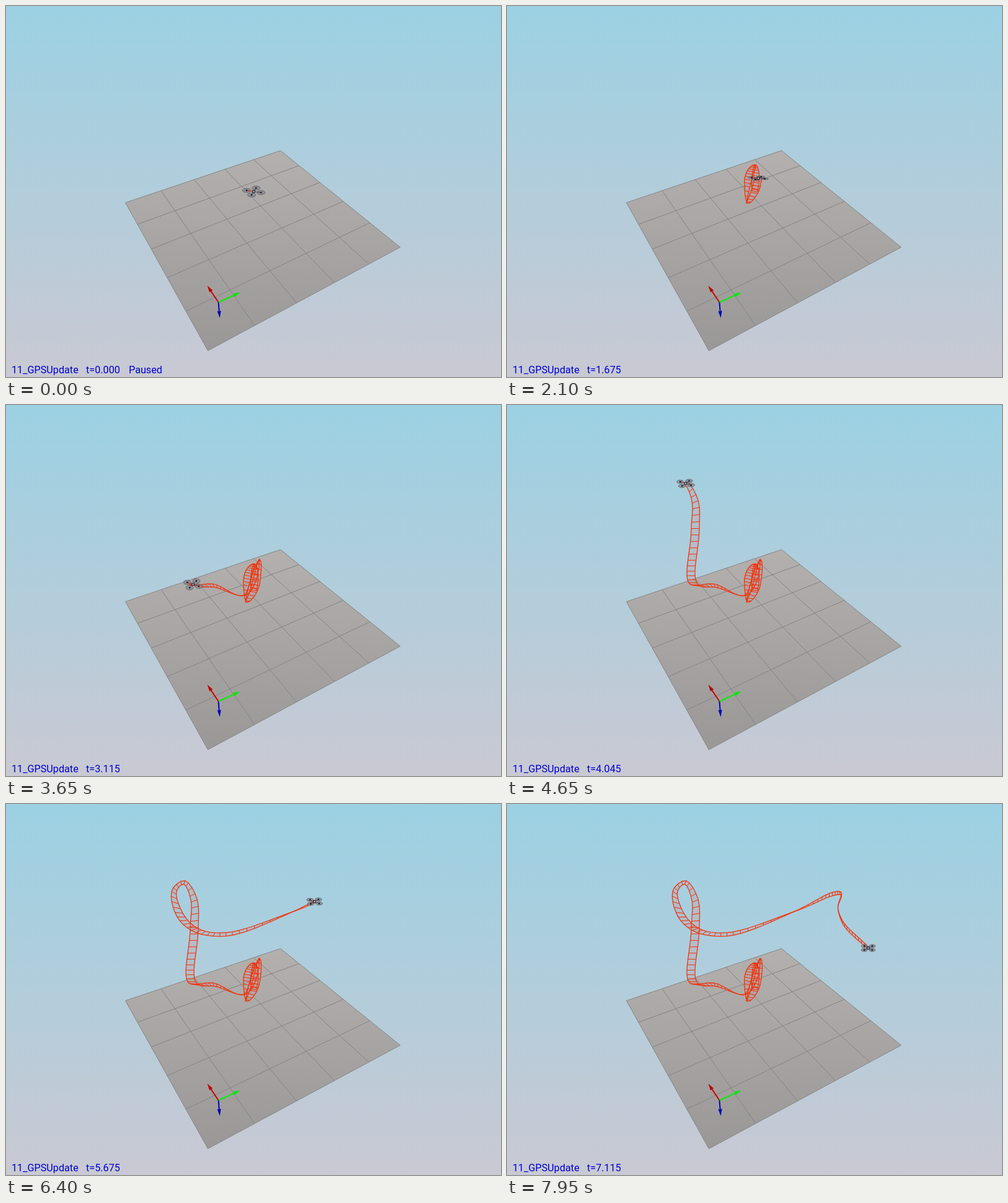
Animation, 798 px wide and 599 px high, one loop 8000 ms. Source, as an HTML page with a canvas:

```html
<!DOCTYPE html>
<html lang="en">
<head>
<meta charset="utf-8">
<title>Drone flight</title>
<style>
html, body { margin: 0; width: 100%; height: 100%; overflow: hidden; }
canvas { display: block; }
</style>
</head>
<body>
<canvas id="stage" width="798" height="599"></canvas>
<script>
const ctx = document.getElementById('stage').getContext('2d');
const LOOP = 8000, TICK = 50, PAUSE = 300, RATE = .93, RUNG = .05;
const { PI, sin, cos } = Math;

// Waypoints of the flight: [seconds, x, y]
const PATH = [
  [0, 399, 299], [.52, 400, 256], [1.025, 387, 288], [1.25, 386, 317],
  [1.55, 400, 296], [1.9, 408, 249], [2.315, 387, 305], [2.8, 334, 291],
  [3.13, 300, 288], [3.65, 303, 199], [3.85, 303, 156], [4.05, 287, 126],
  [4.2, 272, 137], [4.5, 282, 182], [4.75, 310, 205], [5, 354, 210],
  [5.47, 463, 173], [5.9, 524, 145], [6.1, 538, 144], [6.4, 533, 168],
  [6.65, 541, 191], [7.115, 582, 232]
];

const ramp = (t, from, to) => Math.min(1, Math.max(0, (t - from) / (to - from)));

// Smooth curve through the waypoints, with time-weighted tangents
function position(t) {
  const last = PATH.length - 1;
  let i = 0;
  while (i < last - 1 && PATH[i + 1][0] <= t) i++;
  const span = PATH[i + 1][0] - PATH[i][0];
  const f = ramp(t, PATH[i][0], PATH[i + 1][0]);
  return [1, 2].map(axis => {
    const slope = n => (PATH[n + 1][axis] - PATH[n][axis]) / (PATH[n + 1][0] - PATH[n][0]);
    const tangent = n => {
      if (n === 0) return slope(0);
      if (n === last) return slope(n - 1);
      const before = PATH[n][0] - PATH[n - 1][0], after = PATH[n + 1][0] - PATH[n][0];
      return (slope(n - 1) * after + slope(n) * before) / (before + after);
    };
    const a = PATH[i][axis], b = PATH[i + 1][axis];
    return a + (b - a) * f * f * (3 - 2 * f) +
      span * f * (1 - f) * (tangent(i) * (1 - f) - tangent(i + 1) * f);
  });
}

// Half the ribbon's width: rocking at first, then a level climb and a 3/4 roll
function wing(t) {
  const rock = cos(4.5 * (t - .18)) * (1 - ramp(t, 2.1, 2.4));
  const band = ramp(t, 2.5, 2.8) * (t > 5 ? cos(3.4 * (t - 5)) : 1);
  const roll = PI / 2 * (1 - ramp(t, 2.75, 3.12)) - 1.5 * PI * ramp(t, 3.65, 4.95);
  return [6 * rock + 6.5 * band * cos(roll), rock + 2.8 * band * sin(roll)];
}

// The two arms, lying on a tilting ellipse that shrinks with distance
function arms(t) {
  const rx = 12.1 - .43 * t, ry = 4.4 + 2.3 * cos(2.1 * (t - .4)), yaw = .3 + .07 * t;
  return [-rx * cos(yaw), -ry * sin(yaw), rx * sin(yaw), -ry * cos(yaw)];
}

function trace(points, close) {
  ctx.beginPath();
  points.forEach(([x, y]) => ctx.lineTo(x + .5, y + .5));
  if (close) ctx.closePath();
}

function line(points, color, width = 1) {
  trace(points);
  ctx.strokeStyle = color;
  ctx.lineWidth = width;
  ctx.stroke();
}

function fill(points, color) {
  trace(points, true);
  ctx.fillStyle = color;
  ctx.fill();
}

function square(x, y, size, color) {
  ctx.fillStyle = color;
  ctx.fillRect(x + .5 - size / 2, y + .5 - size / 2, size, size);
}

function gradient(y0, y1, from, to) {
  const g = ctx.createLinearGradient(0, y0, 0, y1);
  g.addColorStop(0, from);
  g.addColorStop(1, to);
  return g;
}

// Perspective map from the unit square to the ground plane
function ground(u, v) {
  const w = 1 + .195 * u - .315 * v;
  return [(192 + 336.2 * u + 30.6 * v) / w, (317 - 38.6 * u + 63.9 * v) / w];
}

function drawScene() {
  ctx.fillStyle = gradient(0, 599, '#9bd1e3', '#c9c9d3');
  ctx.fillRect(0, 0, 798, 599);
  fill([ground(0, 0), ground(1, 0), ground(1, 1), ground(0, 1)],
    gradient(233, 556, '#b3b0ae', '#9a9897'));
  for (let i = 0; i <= 5; i++) {
    line([ground(i / 5, 0), ground(i / 5, 1)], '#858483');
    line([ground(0, i / 5), ground(1, i / 5)], '#858483');
  }
}

function drawArrow(x, y, color, headColor) {
  const ox = 342, oy = 478, len = Math.hypot(x - ox, y - oy);
  const dx = (x - ox) / len, dy = (y - oy) / len;
  const bx = x - dx * 11, by = y - dy * 11;
  line([[ox, oy], [bx, by]], color, 2);
  fill([[x, y], [bx - dy * 3, by + dx * 3], [bx + dy * 3, by - dx * 3]], headColor);
}

function drawTrail(t) {
  const left = [], right = [];
  const addRung = time => {
    const [x, y] = position(time), [wx, wy] = wing(time);
    left.push([x - wx, y - wy]);
    right.push([x + wx, y + wy]);
  };
  for (let n = 0; n * RUNG < t; n++) addRung(n * RUNG);
  addRung(t);
  for (let n = 1; n < left.length; n++) {
    fill([left[n - 1], right[n - 1], right[n], left[n]], 'rgba(190,160,165,.35)');
  }
  for (const rail of [left, right]) line(rail, '#f0320a', 1.25);
  left.forEach((p, n) => line([p, right[n]], '#f0320a'));
}

function drawDrone(t) {
  const [cx, cy] = position(t), [ux, uy, vx, vy] = arms(t);
  const at = (p, q) => [cx + ux * p + vx * q, cy + uy * p + vy * q];
  const hubs = [[0, 1], [1, 0], [-1, 0], [0, -1]];
  for (const [p, q] of hubs) {
    ctx.save();
    ctx.transform(ux, uy, vx, vy, cx + .5, cy + .5);
    ctx.beginPath();
    ctx.arc(p, q, .56, 0, 2 * PI);
    ctx.restore();
    ctx.fillStyle = 'rgba(134,134,138,.75)';
    ctx.fill();
    ctx.strokeStyle = '#606064';
    ctx.lineWidth = .8;
    ctx.stroke();
  }
  line([at(-1, 0), at(1, 0)], '#44444c', .8);
  line([at(0, -1), at(0, 1)], '#44444c', .8);
  line([at(.2, 0), at(.75, 0)], '#d0442c', 1.2);
  hubs.forEach(hub => square(...at(...hub), 2.4, '#181838'));
  square(cx, cy, 4.5, '#20203c');
  square(cx, cy, 2, '#e4e4ea');
}

function drawLabel(t, paused) {
  ctx.fillStyle = '#0000d8';
  ctx.font = '400 16.2px Roboto, sans-serif';
  ctx.fillText('11_GPSUpdate', 9, 593);
  ctx.fillText('t=' + t.toFixed(3), 129, 593);
  if (paused) ctx.fillText('Paused', 198, 593);
}

function render(now) {
  const ms = Math.floor(now % LOOP / TICK) * TICK;
  const paused = ms < PAUSE;
  const t = paused ? 0 : Math.floor((ms - PAUSE) * RATE / 10) / 100 + .005;
  drawScene();
  drawArrow(324, 451, '#d00000', '#b80000');
  drawArrow(377, 462, '#00f000', '#00e800');
  drawArrow(344, 503, '#0000d0', '#0000b0');
  if (!paused) drawTrail(t);
  drawDrone(t);
  drawLabel(t, paused);
}

const start = performance.now();
function frame() {
  render(performance.now() - start);
  requestAnimationFrame(frame);
}
frame();
</script>
</body>
</html>
```
